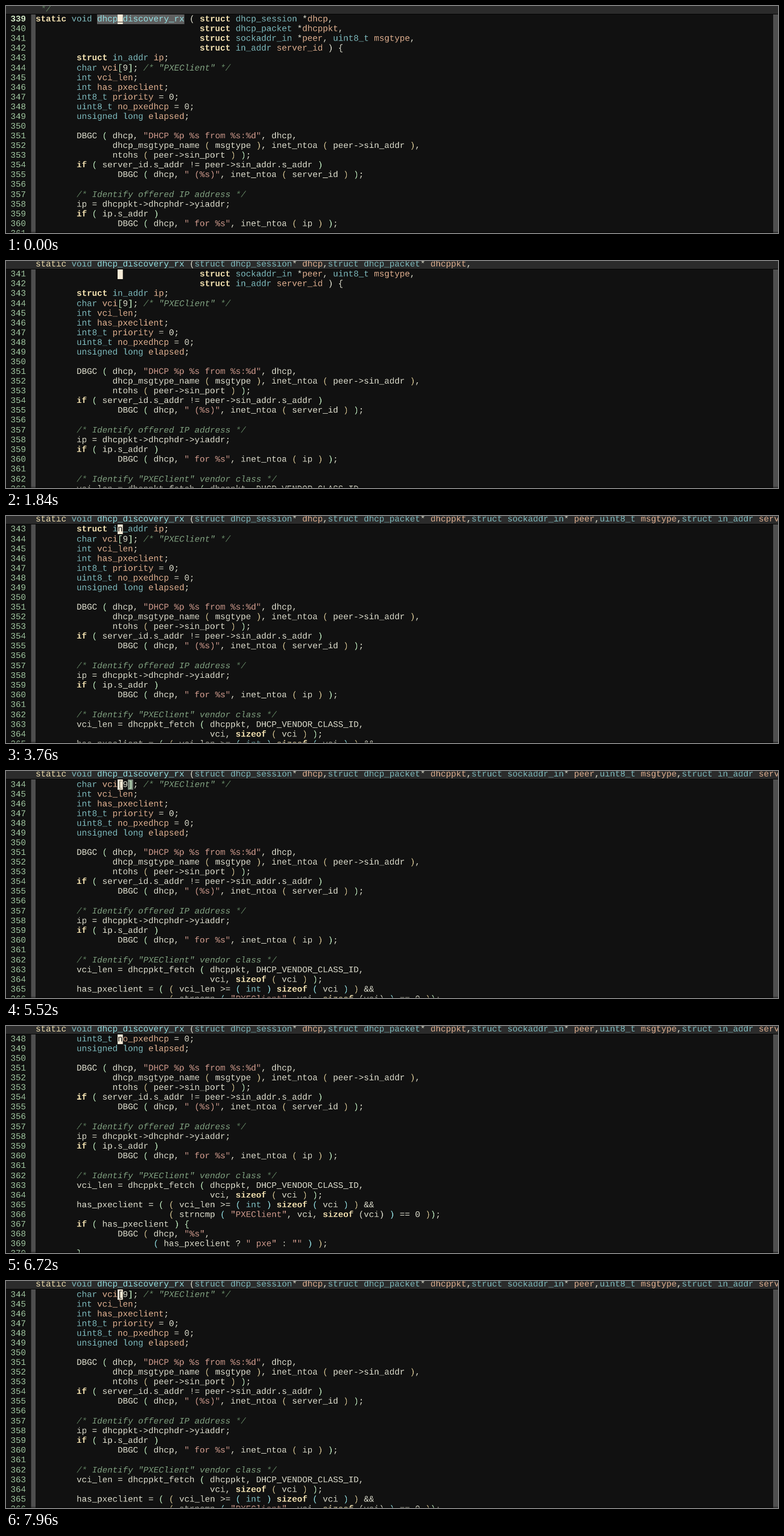
Write an HTML page that moves like this. It is 1280x376 px and loops after 8000 ms.

```html
<!DOCTYPE html>
<html lang="en">
<head>
<meta charset="utf-8">
<title>Sticky function header</title>
<style>
  html, body { margin: 0; width: 100%; height: 100%; overflow: hidden; background: #111; }
  /* Laid out on an 18 x 34 character grid, then scaled to 8.5 px per column. */
  #stage {
    position: absolute; left: 0; top: 0; width: 2711px; height: 797px; overflow: hidden;
    transform: scale(.472222); transform-origin: 0 0; will-change: transform;
    background: #111; color: #dcdccc;
    font: 30px/34px "Liberation Mono", monospace;
    font-kerning: none; font-variant-ligatures: none;
    text-rendering: geometricPrecision;
  }
  #stage div { position: absolute; white-space: pre; }
  #head { left: 0; top: 0; width: 2711px; height: 27.5px; background: #2b2b2b; overflow: hidden; border-bottom: 2px solid #050505; }
  #head div { left: 104px; top: -5.5px; }
  .fringe { top: 29.5px; width: 16px; height: 768px; background: #4f4f4f; }
  #foot { left: 0; top: 790px; width: 2711px; height: 7px; background: linear-gradient(transparent, rgba(0, 0, 0, .6)); }
  .num { left: 16px; color: #9fc59f; }
  .code { left: 104px; }
  .now { font-weight: bold; color: #cfe6c4; }
  .mark { background: #5f5f5f; }
  .pair { background: #7b887b; }
  #cursor { left: 392px; top: 29.5px; width: 18px; background: #f5ead6; color: #111; }
  .key { color: #f0dfaf; font-weight: bold; }
  #head .key { font-weight: normal; }
  .type { color: #7cb8bb; }
  .var { color: #dfaf8f; }
  .fn { color: #93e0e3; }
  .str { color: #cf9a8c; }
  .com { color: #7f9f7f; font-style: italic; }
  .edge { color: #5f7f5f; font-style: italic; }
  .d1 { color: #bfebbf; }
  .d2 { color: #d0bf8f; }
  .d3 { color: #93e0e3; }
</style>
</head>
<body>
<div id="stage">
  <div class="fringe" style="left:88px"></div>
  <div class="fringe" style="left:2694px"></div>
  <div id="text" style="left:0;top:0"></div>
  <div id="cursor"></div>
  <div id="head"><div id="proto"></div></div>
  <div id="foot"></div>
</div>
<script>
const LOOP = 8000, FIRST = 339, ROWS = 23, TOP = 29.5;
const CELL = 18, ROW = 34, LEFT = 104, CURSOR = 16;
const ITALIC_RISE = 2; // lines with italic text are this much taller

const pad = (n, s) => " ".repeat(n) + s;
const source = [
  "static void dhcp_discovery_rx ( struct dhcp_session *dhcp,",
  pad(32, "struct dhcp_packet *dhcppkt,"),
  pad(32, "struct sockaddr_in *peer, uint8_t msgtype,"),
  pad(32, "struct in_addr server_id ) {"),
  pad(8, "struct in_addr ip;"),
  pad(8, 'char vci[9]; /* "PXEClient" */'),
  pad(8, "int vci_len;"),
  pad(8, "int has_pxeclient;"),
  pad(8, "int8_t priority = 0;"),
  pad(8, "uint8_t no_pxedhcp = 0;"),
  pad(8, "unsigned long elapsed;"),
  "",
  pad(8, 'DBGC ( dhcp, "DHCP %p %s from %s:%d", dhcp,'),
  pad(15, "dhcp_msgtype_name ( msgtype ), inet_ntoa ( peer->sin_addr ),"),
  pad(15, "ntohs ( peer->sin_port ) );"),
  pad(8, "if ( server_id.s_addr != peer->sin_addr.s_addr )"),
  pad(16, 'DBGC ( dhcp, " (%s)", inet_ntoa ( server_id ) );'),
  "",
  pad(8, "/* Identify offered IP address */"),
  pad(8, "ip = dhcppkt->dhcphdr->yiaddr;"),
  pad(8, "if ( ip.s_addr )"),
  pad(16, 'DBGC ( dhcp, " for %s", inet_ntoa ( ip ) );'),
  "",
  pad(8, '/* Identify "PXEClient" vendor class */'),
  pad(8, "vci_len = dhcppkt_fetch ( dhcppkt, DHCP_VENDOR_CLASS_ID,"),
  pad(34, "vci, sizeof ( vci ) );"),
  pad(8, "has_pxeclient = ( ( vci_len >= ( int ) sizeof ( vci ) ) &&"),
  pad(26, '( strncmp ( "PXEClient", vci, sizeof (vci) ) == 0 ));'),
  pad(8, "if ( has_pxeclient ) {"),
  pad(16, 'DBGC ( dhcp, "%s",'),
  pad(23, '( has_pxeclient ? " pxe" : "" ) );'),
  pad(8, "}"),
];
const params = [
  "struct dhcp_session* dhcp,", "struct dhcp_packet* dhcppkt,",
  "struct sockaddr_in* peer,uint8_t msgtype,", "struct in_addr server_id ) {",
];

// at: ms, top: first line; mark: [column, length, extra class]
const steps = [
  { at: 0, top: 339, mark: [12, 17, ""] },
  { at: 1040, top: 340 },
  { at: 1840, top: 341 },
  { at: 2720, top: 342 },
  { at: 3760, top: 343 },
  { at: 5120, top: 343, mark: [15, 7, ""] },
  { at: 5360, top: 344 },
  { at: 5520, top: 344, mark: [18, 1, "pair"] },
  { at: 5840, top: 345 },
  { at: 6200, top: 346 },
  { at: 6480, top: 347 },
  { at: 6720, top: 348 },
  { at: 7040, top: 347 },
  { at: 7280, top: 346 },
  { at: 7600, top: 345 },
  { at: 7960, top: 344 },
];

const keys = /^(static|struct|if|sizeof)$/;
const types = /^(void|char|u?int8_t|int|unsigned|long|dhcp_session|dhcp_packet|sockaddr_in|in_addr)$/;
const escape = s => s.replace(/&/g, "&amp;").replace(/</g, "&lt;").replace(/>/g, "&gt;");
const span = (name, s) => name ? `<span class="${name}">${escape(s)}</span>` : escape(s);

function painter(isHead) {
  let depth = 0;
  return line => {
    let afterType = false;
    return line.replace(/\/\*.*?\*\/|"[^"]*"|\w+|\s+|./g, t => {
      if (t.startsWith("/*"))
        return span("edge", "/* ") + span("com", t.slice(3, -2)) + span("edge", "*/");
      if (t[0] === '"') return span("str", t);
      if (/^\s+$/.test(t) || t === "*") return t;
      const declared = afterType;
      afterType = types.test(t);
      if (afterType || (isHead && t === "struct")) return span("type", t);
      if (keys.test(t)) return span("key", t);
      if (t === "dhcp_discovery_rx") return span("fn", t);
      if (declared && /^[a-z]/.test(t)) return span("var", t);
      if (/[([{]/.test(t)) return span(!isHead && depth++ ? "d" + (depth - 1) : "", t);
      if (/[)\]}]/.test(t)) return span(!isHead && --depth > 0 ? "d" + depth : "", t);
      return escape(t);
    });
  };
}

const painted = source.map(painter(false));
const rise = n => (source[n - FIRST] || "").includes("/*") ? ITALIC_RISE : 0;
const byId = id => document.getElementById(id);

function protoFor(top) {
  if (top === FIRST) return span("edge", " */");
  return painter(true)("static void dhcp_discovery_rx (" + params.slice(0, top - FIRST).join(""));
}

function draw({ top, mark }) {
  let html = "", y = TOP;
  if (mark) {
    const [col, len, extra] = mark;
    html += `<div class="mark ${extra}" style="left:${LEFT + col * CELL}px;top:${TOP}px;`
      + `width:${len * CELL}px;height:${ROW + rise(top)}px"></div>`;
  }
  for (let n = top; n < top + ROWS; n++) {
    y += rise(n);
    html += `<div class="num${n === FIRST ? " now" : ""}" style="top:${y}px">${n}</div>`
      + `<div class="code" style="top:${y}px">${painted[n - FIRST] || ""}</div>`;
    y += ROW;
  }
  byId("text").innerHTML = html;
  byId("proto").innerHTML = protoFor(top);
  const cursor = byId("cursor");
  cursor.textContent = source[top - FIRST][CURSOR] || " ";
  cursor.style.paddingTop = rise(top) + "px";
  cursor.style.color = mark && mark[2] ? "#6f6f5f" : "#111";
}

let shown = null;
function tick() {
  const t = performance.now() % LOOP;
  const step = steps.findLast(s => s.at <= t);
  if (step !== shown) draw(shown = step);
  requestAnimationFrame(tick);
}
tick();
</script>
</body>
</html>
```
